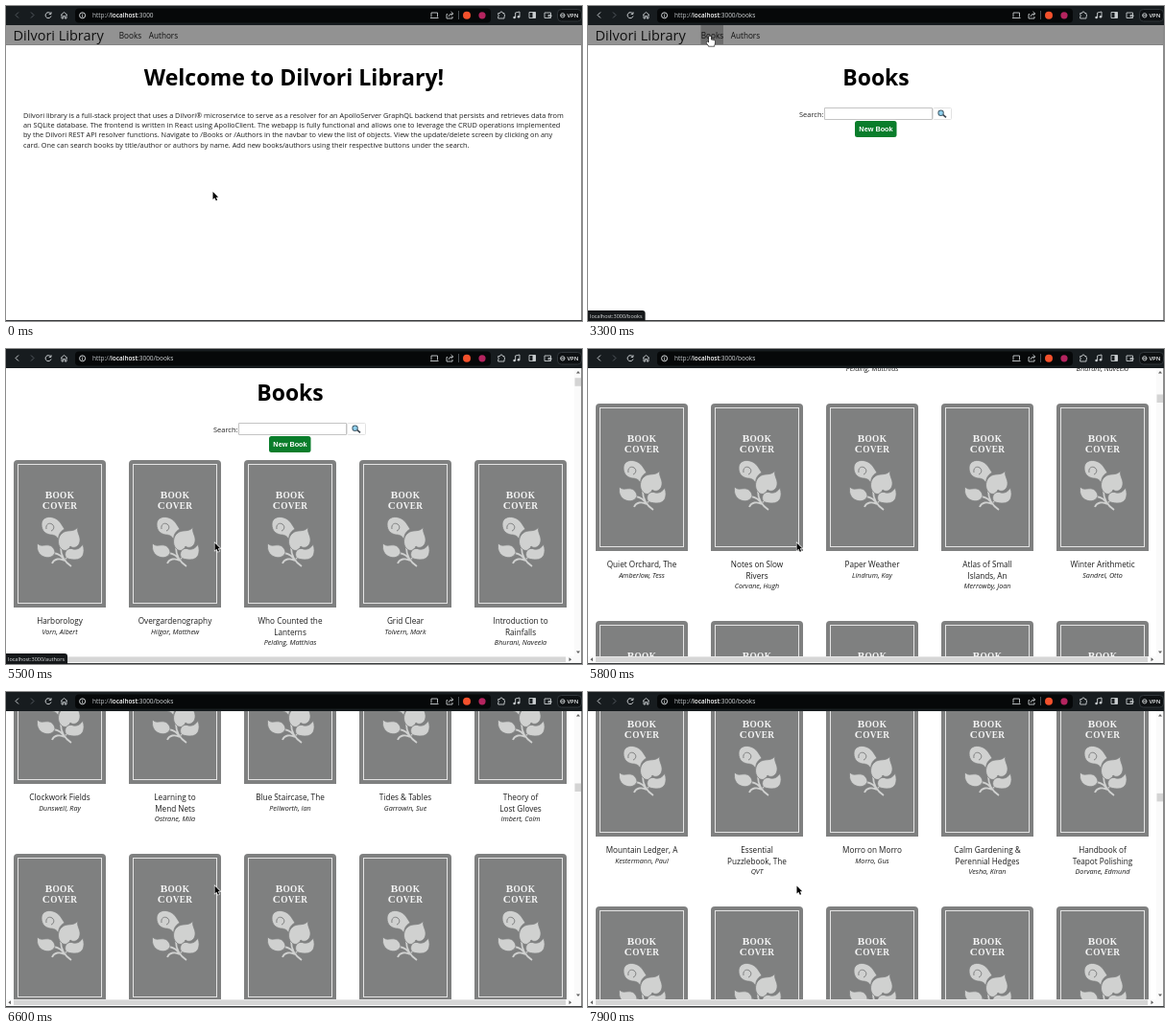
An HTML page with a canvas that plays this animation: 600x329 px, repeating every 8 s.

```html
<!DOCTYPE html>
<html lang="en">
<head>
<meta charset="utf-8">
<title>Dilvori Library</title>
<style>
html, body { margin: 0; width: 100%; height: 100%; overflow: hidden; background: #fff; }
canvas { display: block; width: 600px; height: 329px; }
</style>
</head>
<body>
<canvas id="stage" width="600" height="329"></canvas>
<script>
const ctx = document.getElementById('stage').getContext('2d');
const LOOP = 8000, STEP = 100;
const SANS = '"Open Sans", "Noto Sans", sans-serif';
const SERIF = '"Liberation Serif", "Noto Serif", serif';
const ROW_H = 227, COL_W = 120, FIRST_ROW = 145;
const GREY = '#7f8080', PALE = '#d0d1d0';

// [time, value...] key points, linear in between
const SCROLL = [[5400, 0], [5500, 29], [6200, 696], [7000, 1526], [7200, 1590],
  [7300, 1560], [7600, 1380], [7700, 1380], [7900, 1283]];
const POINTER = [[0, 215.5, 194], [100, 214, 192], [400, 196, 138], [700, 196, 138], [1600, 127, 32],
  [3500, 127, 32], [4000, 163, 31], [4600, 164, 31], [4800, 169, 62], [4900, 169, 62],
  [5000, 195, 140], [5100, 217.5, 202.5]];

const INTRO = [
  'Dilvori library is a full-stack project that uses a Dilvori® microservice to serve as a resolver for an ApolloServer GraphQL backend that persists and retrieves data from',
  'an SQLite database. The frontend is written in React using ApolloClient. The webapp is fully functional and allows one to leverage the CRUD operations implemented',
  'by the Dilvori REST API resolver functions. Navigate to /Books or /Authors in the navbar to view the list of objects. View the update/delete screen by clicking on any',
  'card. One can search books by title/author or authors by name. Add new books/authors using their respective buttons under the search.'
];

// title lines split by "|", author after "/"
const SHELF = [
  ['Harborology/Vorn, Albert', 'Overgardenography/Hilgar, Matthew', 'Who Counted the|Lanterns/Pelding, Matthias', 'Grid Clear/Tolvern, Mark', 'Introduction to|Rainfalls/Bhurani, Naveela'],
  ['Quiet Orchard, The/Amberlow, Tess', 'Notes on Slow|Rivers/Corvane, Hugh', 'Paper Weather/Lindrum, Kay', 'Atlas of Small|Islands, An/Merrowby, Joan', 'Winter Arithmetic/Sandrel, Otto'],
  ['Topiaries, Vol I/Orr, Gilbent', 'Kitchen Lighting|for Beekeepers/Halvey, Finn', 'Way of Pebbles, The/Lindo, Torvald', 'Kettle and the|Stove, The/Marrow, Pete', "Hardly You're Idling|Mr Dunmorr/Dunmorr, Philip"],
  ['Story of Cartography,|The/Fenlow, Carl', 'Pencils for Map|Drawing/Tarbrook, Lew', 'Runali Runali/Kolvankar, R M', 'Greeting to Oars, A/Wetherlan, Osbert', 'Ferryman, The/Holbrand, Leopold'],
  ['Clockwork Fields/Dunswell, Ray', 'Learning to|Mend Nets/Ostrane, Mila', 'Blue Staircase, The/Pellworth, Ian', 'Tides & Tables/Garrowin, Sue', 'Theory of|Lost Gloves/Imbert, Colm'],
  ['Mountain Ledger, A/Kestermann, Paul', 'Essential|Puzzlebook, The/QVT', 'Morro on Morro/Morro, Gus', 'Calm Gardening &|Perennial Hedges/Vesha, Kiran', 'Handbook of|Teapot Polishing/Dorvane, Edmund'],
  ['Try Me B/Mirvadkar, Dinesha', 'Lantern of|Velmirand, The/Brenn, Sebastian', 'Frost and|Merriment/Velimovsky, Anatol', 'Badgers & Larks/Plumb, Ned', 'Contemplative|Baker, The/Dey, Nirupan'],
  ['Copper Valley, A/Storrand, Jill', 'Seven Spare|Buttons/Wendlow, Art', 'Long Way to Tea/Farrowen, Ida', 'Simple Bridges/Culverin, Max', 'Letters from|a Lighthouse/Nordal, Brit']
];

const LEAVES = [
  'M48 86C46 80 43 78 38 78C33 77 29 74 29 67C29 61 35 58 41 60C48 62 50 68 53 72C48 75 45 80 48 86Z',
  'M67 70C65 75 70 79 69 85C68 91 62 93 59 90C57 95 52 96 49 92C45 88 46 79 51 76C56 72 62 76 67 70Z',
  'M43 97C40 103 33 103 28 99C24 95 24 90 25 87C28 91 32 88 37 89C41 90 43 94 43 97Z',
  'M54 101C52 94 58 91 62 93C67 94 70 91 72 88C75 97 72 104 64 104C59 104 55 103 54 101Z'
].map(d => new Path2D(d));
const CURL = new Path2D('M34 72C33 67 37 65 40 67C43 69 42 73 39 74');
const STEMS = new Path2D('M49 91C49 100 54 107 60 111M42 97C47 98 51 101 53 105M53 105C48 102 42 103 40 108M54 103L60 99');
const ARROW = new Path2D('M0 0V8L1.9 6.3L3.2 9.3L4.6 8.7L3.3 5.7H5.7Z');
const HAND = new Path2D('M-1 0Q0 -1 1 0V3.2L4.6 4Q5.4 4.4 5.2 6L4.4 9.8H-1.2L-3.6 6.2Q-3.4 5 -2.2 5.6L-1 6.6Z');

function at(keys, t) {
  let i = 0;
  while (i < keys.length - 1 && keys[i + 1][0] <= t) i++;
  const a = keys[i], b = keys[i + 1];
  if (!b || t <= a[0]) return a.slice(1);
  const k = (t - a[0]) / (b[0] - a[0]);
  return a.slice(1).map((v, n) => v + (b[n + 1] - v) * k);
}

function rect(x, y, w, h, color) {
  ctx.fillStyle = color;
  ctx.fillRect(x, y, w, h);
}

function round(x, y, w, h, r, color, line) {
  ctx.beginPath();
  ctx.roundRect(x, y, w, h, r);
  if (color) { ctx.fillStyle = color; ctx.fill(); }
  if (line) { ctx.strokeStyle = line; ctx.lineWidth = 1; ctx.stroke(); }
}

function text(s, x, y, font, color = '#111', align = 'left') {
  ctx.font = font;
  ctx.fillStyle = color;
  ctx.textAlign = align;
  ctx.fillText(s, x, y);
  return ctx.measureText(s).width;
}

function stroke(d, color, width = 1) {
  ctx.strokeStyle = color;
  ctx.lineWidth = width;
  ctx.stroke(typeof d === 'string' ? new Path2D(d) : d);
}

function dot(x, y, r, color) {
  ctx.beginPath();
  ctx.arc(x, y, r, 0, 7);
  ctx.fillStyle = color;
  ctx.fill();
}

function toolbar(onBooks) {
  const ink = '#c9cdd0', dim = '#555b60';
  rect(0, 0, 600, 20, '#171c1f');
  round(72, 2.5, 433, 15, 4, '#060809');
  stroke('M13 6.5L10 9.5L13 12.5', onBooks ? ink : dim);
  stroke('M26 6.5L29 9.5L26 12.5', dim);
  stroke('M46.6 8A3 3 0 1 0 47 10.5M47 6.3V8.4H44.8', ink);
  stroke('M57 9.5L60.5 6.5L64 9.5M58 9V13H59.6V10.5H61.4V13H63V9', ink, 0.9);
  stroke('M82.6 9.8A3 3 0 1 0 76.6 9.8A3 3 0 1 0 82.6 9.8M79.6 9.4V11.6M79.6 7.8V8.6', '#e4e6e8', 0.9);

  let x = 90;
  x += text('http://', x, 12.3, '6.5px ' + SANS, '#c3c7ca');
  x += text('localhost', x, 12.3, '600 6.4px ' + SANS, '#fff');
  text(':3000' + (onBooks ? '/books' : ''), x, 12.3, '6.5px ' + SANS, '#d3d6d8');

  stroke('M443 11.5V7H449.5V11.5M442 12.5H450.5', ink, 0.9);
  stroke('M460 8.5H459V13H465V11M461 11Q461.5 8 465.5 8M463.5 6L465.8 8L463.5 10', ink, 0.9);
  rect(471, 5, 1, 9, '#4a4f53');
  dot(480, 9.8, 4, '#f4512c');
  dot(496, 9.8, 3.6, '#b4245f');
  stroke('M512.7 7.5H514.5Q514.5 6 516 6T517.5 7.5H519V9Q520.6 10 519 11V13H512.7V11Q514.2 10 512.7 9Z', ink, 0.9);
  stroke('M530.6 12V7L535 6V11', ink, 0.9);
  dot(529.6, 12, 1.3, ink);
  dot(534, 11.3, 1.3, ink);
  stroke('M545 6.5H551.5V12.5H545Z', ink, 0.9);
  rect(548.5, 6.5, 3, 6, ink);
  stroke('M561 7H567.5V12.5H561ZM565 9.5H568V11H565Z', ink, 0.9);
  round(574.5, 3.5, 25, 12.5, 4, '#0d1012', '#30363a');
  stroke('M582 9.8A2.2 2.2 0 1 0 577.6 9.8A2.2 2.2 0 1 0 582 9.8M577.6 9.8H582', ink, 0.9);
  text('VPN', 584.4, 12.1, '600 5.9px ' + SANS, '#eceeef');
}

function navbar(hover) {
  rect(0, 20, 600, 21, '#929292');
  rect(0, 40, 600, 1, '#858585');
  if (hover === 'books') rect(117.5, 20, 23.5, 20, '#6d6d6d');
  if (hover === 'authors') rect(148.5, 20, 31, 20, '#6d6d6d');
  text('Dilvori Library', 7.5, 36.4, '14.5px ' + SANS);
  text('Books', 117.8, 33.8, '8.2px ' + SANS);
  text('Authors', 148.8, 33.8, '8.2px ' + SANS);
}

function home() {
  text('Welcome to Dilvori Library!', 300, 83, '700 23.1px ' + SANS, '#000', 'center');
  INTRO.forEach((s, i) => text(s, 18, 116.6 + i * 10.4, '7.34px ' + SANS, '#1c1c1c'));
}

function bookHead(mid) {
  text('Books', mid, 83, '700 22.9px ' + SANS, '#000', 'center');
  round(mid - 53.5, 106.5, 112, 12, 0, '#fff', '#c4c4c4');
  text('Search:', mid - 54.5, 116, '7.5px ' + SANS, '#222', 'right');
  round(mid + 59.5, 106.5, 19, 12, 1, '#fff', '#e2e2e2');
  stroke(`M${mid + 69.6} 113.4L${mid + 73} 116.4`, '#3c4650', 1.7);
  dot(mid + 67.6, 111.8, 3.2, '#46606f');
  dot(mid + 67.6, 111.8, 2.2, '#8fd0ee');
  round(mid - 22, 120, 43.5, 17, 2.5, '#0a7d2b');
  text('New Book', mid, 131, '700 7.3px "Liberation Sans", Arial, sans-serif', '#fff', 'center');
}

function smallCaps(word, y) {
  const big = '700 11.2px ' + SERIF, small = '700 9.3px ' + SERIF;
  const head = word[0], tail = word.slice(1);
  ctx.letterSpacing = '0.3px';
  ctx.font = big;
  const w = ctx.measureText(head).width;
  ctx.font = small;
  const x = 48 - (w + ctx.measureText(tail).width) / 2;
  text(head, x, y, big, '#f4f4f4');
  text(tail, x + w, y, small, '#f4f4f4');
  ctx.letterSpacing = '0px';
}

function cover(x, y) {
  ctx.save();
  ctx.translate(x, y);
  round(0, 0, 96, 154, [4, 4, 0, 0], GREY);
  ctx.strokeStyle = '#e4e4e4';
  ctx.lineWidth = 1;
  ctx.strokeRect(4.5, 4.5, 87, 145);
  smallCaps('BOOK', 39.8);
  smallCaps('COVER', 51.2);
  stroke(STEMS, PALE, 1.8);
  for (const leaf of LEAVES) {
    ctx.fillStyle = PALE;
    ctx.fill(leaf);
    stroke(leaf, GREY, 0.8);
  }
  stroke(CURL, GREY, 1);
  ctx.restore();
}

function card(entry, x, y) {
  cover(x, y);
  const [title, author] = entry.split('/');
  let base = y + 171.2;
  for (const line of title.split('|')) {
    text(line, x + 48, base, '8.2px ' + SANS, '#1c1c1c', 'center');
    base += 11.4;
  }
  text(author, x + 48, base - 0.9, 'italic 7.2px ' + SANS, '#1c1c1c', 'center');
}

function triangle(x, y, dx, dy) {
  ctx.beginPath();
  ctx.moveTo(x + dx * 1.6, y + dy * 1.6);
  ctx.lineTo(x - dx + dy * 2, y - dy + dx * 2);
  ctx.lineTo(x - dx - dy * 2, y - dy - dx * 2);
  ctx.fillStyle = '#606060';
  ctx.fill();
}

function scrollbars(scroll) {
  rect(592, 20, 8, 309, '#fafafa');
  rect(0, 321, 600, 7, '#fafafa');
  rect(592.5, 28.5 + scroll * 0.0603, 6.5, 8.5, '#d4d4d4');
  rect(8, 321.5, 575, 5.5, '#d6d6d6');
  triangle(596, 24.5, 0, -1);
  triangle(596, 316.5, 0, 1);
  triangle(4, 324.3, -1, 0);
  triangle(587.5, 324.3, 1, 0);
}

function status(page) {
  const s = 'localhost:3000/' + page;
  ctx.font = '5.5px ' + SANS;
  round(0, 318, ctx.measureText(s).width + 5, 11, [0, 3, 0, 0], '#15181a');
  text(s, 2, 325.6, '5.5px ' + SANS, '#dfe1e2');
}

function pointer(x, y, link) {
  ctx.save();
  ctx.translate(x, y);
  const shape = link ? HAND : ARROW;
  stroke(shape, link ? '#222' : '#fff', 1.2);
  ctx.fillStyle = link ? '#fff' : '#000';
  ctx.fill(shape);
  ctx.restore();
}

function draw(t) {
  const [px, py] = at(POINTER, t);
  const [scroll] = at(SCROLL, t);
  const onBooks = t >= 2600, loaded = t >= 4300;
  let hover = '';
  if (py < 41 && px >= 117 && px <= 141) hover = 'books';
  if (py < 41 && px >= 148 && px <= 180) hover = 'authors';

  rect(0, 0, 600, 329, '#fff');
  ctx.save();
  ctx.translate(0, -Math.round(scroll));
  navbar(hover);
  if (!onBooks) home();
  else bookHead(loaded ? 296 : 300);
  if (loaded) {
    SHELF.forEach((row, r) => {
      const y = FIRST_ROW + r * ROW_H;
      if (y - scroll > 329 || y - scroll < -ROW_H) return;
      row.forEach((entry, c) => card(entry, 8 + c * COL_W, y));
    });
  }
  ctx.restore();

  if (loaded) scrollbars(scroll);
  toolbar(onBooks);
  rect(599, 20, 1, 309, '#8a8a8a');
  rect(0, 328, 600, 1, '#3a3d3f');
  if (t >= 3700 && t < 5800) status('authors');
  else if (t >= 1700 && t < 3700) status('books');
  pointer(px, py, hover);
}

const start = performance.now();
let shown = -1;
function tick() {
  const t = Math.floor((performance.now() - start) % LOOP / STEP) * STEP;
  if (t !== shown) draw(shown = t);
  requestAnimationFrame(tick);
}
tick();
</script>
</body>
</html>
```
